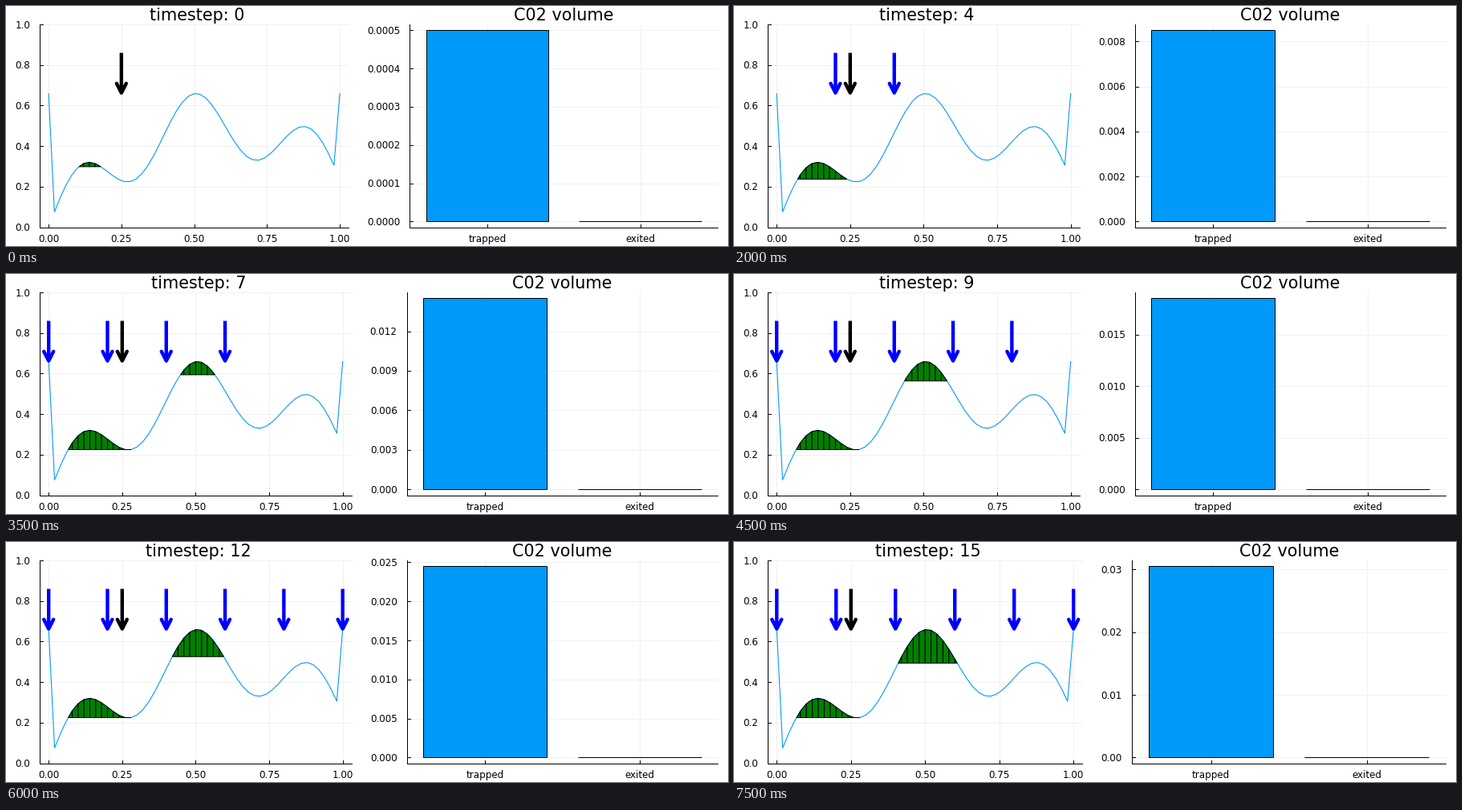
A matplotlib script for the animation above (8 s loop, 900x300 px).

```python
import numpy as np
import matplotlib.pyplot as plt
from matplotlib.animation import FuncAnimation
from matplotlib.patches import Polygon

W, H, DPI = 900, 300, 100
PX = 72 / DPI                      # one pixel in points
STEPS, INTERVAL = 16, 500
TOP, BOTTOM = 23.1, 276.6
BLUE, GRID = "#009AFA", "#f0f0f0"

plt.rcParams["font.family"] = "DejaVu Sans"
fig = plt.figure(figsize=(W / DPI, H / DPI), dpi=DPI, facecolor="white")
ax = fig.add_axes([0, 0, 1, 1])

# Height profile with closed side walls
X = np.linspace(0, 1, 51)
TERRAIN = 0.1495 * np.sin(5 * np.pi * X) + 0.3895 * np.sin(np.pi * X) + 0.24 * X
TERRAIN[[0, -1]] = TERRAIN.max()

LEFT_TRAP, MID_TRAP = (1, 14), (14, 36)
SPILL = TERRAIN[13:15].min()
CAPACITY = 0.0096
MIN_DRAWN = 0.001

TICK_STEP = [1e-4, 5e-4, 1e-3, 1e-3, 2e-3, 2.5e-3, 2e-3, 3e-3] + [5e-3] * 7 + [1e-2]
WELLS = {0.4: 1, 0.2: 4, 0.0: 6, 0.6: 7, 0.8: 9, 1.0: 10}   # position: first step


def cells(trap, level):
    """Trapezoids between the terrain and a flat level below it."""
    out = []
    for i in range(*trap):
        x0, x1, h0, h1 = X[i], X[i + 1], TERRAIN[i], TERRAIN[i + 1]
        if max(h0, h1) < level:
            continue
        cut = x0 + (x1 - x0) * (level - h0) / (h1 - h0)
        if h0 < level:
            x0, h0 = cut, level
        elif h1 < level:
            x1, h1 = cut, level
        out.append([(x0, level), (x0, h0), (x1, h1), (x1, level)])
    return out


def area(trap, level):
    return sum((c[2][0] - c[1][0]) * ((c[1][1] + c[2][1]) / 2 - level)
               for c in cells(trap, level))


def level_for(trap, volume):
    lo, hi = SPILL, TERRAIN[trap[0]:trap[1]].max()
    for _ in range(30):
        mid = (lo + hi) / 2
        if area(trap, mid) > volume:
            lo = mid
        else:
            hi = mid
    return hi


def gas(volume):
    if volume < CAPACITY:
        return cells(LEFT_TRAP, level_for(LEFT_TRAP, max(volume, MIN_DRAWN)))
    rest = max(volume - CAPACITY, MIN_DRAWN)
    return cells(LEFT_TRAP, SPILL) + cells(MID_TRAP, level_for(MID_TRAP, rest))


def line(xs, ys, color="black", width=1, z=2, **kw):
    ax.plot(xs, ys, color=color, lw=width * PX, zorder=z, **kw)


def label(x, y, s, size=11.85, ha="center"):
    ax.text(x, y, s, fontsize=size * PX, ha=ha, va="baseline")


def frame(x0, x1, xticks, yticks):
    """Grid, axes, inward ticks and labels; ticks are (pixel, text) pairs."""
    for x, s in xticks:
        line([x, x], [TOP, BOTTOM], GRID, z=0)
        line([x, x], [BOTTOM, BOTTOM - 4])
        label(x, 295.3, s)
    for y, s in yticks:
        line([x0, x1], [y, y], GRID, z=0)
        line([x0, x0 + 4], [y, y])
        label(x0 - 12, y + 4.5, s, ha="right")
    line([x0, x1], [BOTTOM, BOTTOM])
    line([x0, x0], [TOP, BOTTOM])


def arrow(x, y0, y1, color):
    style = dict(color=color, width=4.4, z=5, solid_joinstyle="round", snap=False)
    line([x, x], [y0, y1 - 2], solid_capstyle="butt", **style)
    line([x - 6, x, x + 6], [y1 - 12.5, y1 - 0.7, y1 - 12.5],
         solid_capstyle="round", **style)


def draw_profile(t, volume, x1):
    x0 = 42.2
    unit = (x1 - x0) / 1.06

    def px(x):
        return x0 + (x + 0.03) * unit

    def py(y):
        return BOTTOM - y * (BOTTOM - TOP)

    frame(x0, x1,
          [(px(v), f"{v:.2f}") for v in np.linspace(0, 1, 5)],
          [(py(v), f"{v:.1f}") for v in np.linspace(0, 1, 6)])
    line(px(X), py(TERRAIN), BLUE, 1.1, z=3)
    for cell in gas(volume):
        ax.add_patch(Polygon([(px(x), py(y)) for x, y in cell], fc="green",
                             ec="black", lw=PX, zorder=4))
    arrow(px(0.25), py(0.86), py(0.66), "black")
    for x, start in WELLS.items():
        if t >= start:
            arrow(px(x), py(0.86), py(0.66), "blue")
    label((x0 + x1) / 2 + 3.6, 18.3, f"timestep: {t}", 20.8)


def draw_bars(volume, step, digits, x0):
    x1 = 887.4
    unit = (x1 - x0) / 2.016       # two slots plus a margin around the bars
    centers = [x0 + 0.508 * unit, x1 - 0.508 * unit]
    pad = 0.03 * (BOTTOM - TOP) / 1.06
    base = BOTTOM - pad
    scale = (base - TOP - pad) / volume

    count = int(1.03 * volume / step) + 1
    frame(x0, x1, list(zip(centers, ["trapped", "exited"])),
          [(base - k * step * scale, f"{k * step:.{digits}f}") for k in range(count)])
    for c, v in zip(centers, [volume, 0]):
        l, r, top = c - 0.4 * unit, c + 0.4 * unit, base - v * scale
        ax.add_patch(Polygon([(l, base), (l, top), (r, top), (r, base)],
                             fc=BLUE, ec="black", lw=PX, zorder=3))
    label((x0 + x1) / 2, 18.3, "C02 volume", 20.8)


def draw(t):
    ax.clear()
    ax.set(xlim=(0, W), ylim=(H, 0))
    ax.axis("off")
    volume = 0.0005 + 0.002 * t
    step = TICK_STEP[t]
    digits = len(f"{step:.4f}".rstrip("0")) - 2
    shift = 3.65 * (4 - digits)    # shorter labels leave wider plots
    draw_profile(t, volume, 427 + shift)
    draw_bars(volume, step, digits, 503.3 - shift)
    return []


anim = FuncAnimation(fig, draw, frames=STEPS, init_func=lambda: [],
                     interval=INTERVAL, repeat=True, repeat_delay=0)
plt.show()
```
